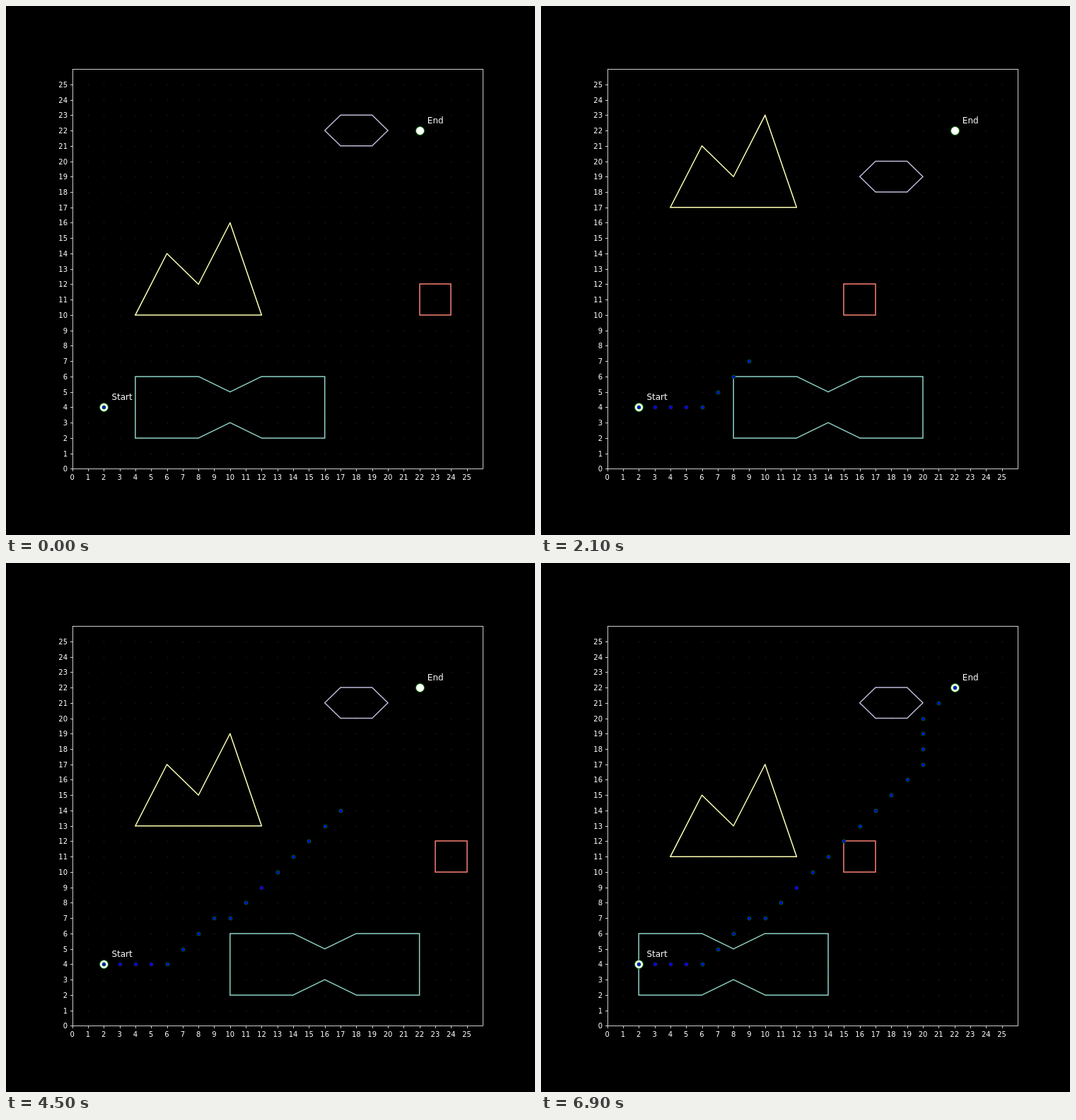
An HTML page with a canvas for the animation above (7.2 s loop, 748 by 748 pixels).

```html
<!DOCTYPE html>
<html lang="en">
<head>
<meta charset="utf-8">
<title>Path among moving obstacles</title>
<style>
  html, body { margin: 0; width: 100%; height: 100%; overflow: hidden; background: #000; }
  canvas { display: block; }
</style>
</head>
<body>
<canvas id="stage" width="748" height="748"></canvas>
<script>
const ctx = document.getElementById('stage').getContext('2d');
const STEP_MS = 300, STEPS = 24, CELLS = 26;
const LEFT = 93.6, BOTTOM = 654.4, UNIT_X = 22.32, UNIT_Y = 21.744;

const px = x => LEFT + x * UNIT_X;
const py = y => BOTTOM - y * UNIT_Y;
const mid = v => Math.floor(v + 0.5) + 0.5;

const BELT = [[0, 2], [4, 2], [6, 3], [8, 2], [12, 2], [12, 6], [8, 6], [6, 5], [4, 6], [0, 6]];
const PEAKS = [[4, 0], [6, 4], [8, 2], [10, 6], [12, 0]];
const HEX = [[16, 0], [17, 1], [19, 1], [20, 0], [19, -1], [17, -1]];
const BOX = [[0, 10], [2, 10], [2, 12], [0, 12]];

// The route is a start cell followed by runs of [count, dx, dy].
const RUNS = [[4, 1, 0], [3, 1, 1], [1, 1, 0], [10, 1, 1], [3, 0, 1], [2, 1, 1]];
const route = [[2, 4]];
for (const [count, dx, dy] of RUNS) {
  for (let i = 0; i < count; i++) {
    const [x, y] = route[route.length - 1];
    route.push([x + dx, y + dy]);
  }
}
const BLUISH = [1, 2, 3, 10];

// Triangle wave between 0 and range.
function bounce(n, range) {
  const p = n % (2 * range);
  return Math.min(p, 2 * range - p);
}

// Triangle wave that rests one step at each end.
function restingBounce(n, range) {
  const p = n % (2 * range + 2);
  return Math.min(p, 2 * range + 1 - p);
}

function outline(points, dx, dy, color, snap) {
  const fit = snap ? Math.round : v => v;
  ctx.strokeStyle = color;
  ctx.lineWidth = 1.5;
  ctx.lineJoin = 'round';
  ctx.lineCap = 'square';
  ctx.beginPath();
  for (const [x, y] of [...points, points[0]]) {
    ctx.lineTo(fit(px(x + dx)), fit(py(y + dy)));
  }
  ctx.stroke();
}

function marker(x, y, radius, fill, edge) {
  ctx.beginPath();
  ctx.arc(mid(px(x)), mid(py(y)), radius, 0, 2 * Math.PI);
  ctx.fillStyle = fill;
  ctx.fill();
  ctx.strokeStyle = edge;
  ctx.lineWidth = 1;
  ctx.stroke();
}

function line(x1, y1, x2, y2) {
  ctx.beginPath();
  ctx.moveTo(x1, y1);
  ctx.lineTo(x2, y2);
  ctx.stroke();
}

function label(text, x, y, size, align) {
  ctx.font = size + 'px "DejaVu Sans", sans-serif';
  ctx.textAlign = align;
  ctx.fillStyle = '#fff';
  ctx.fillText(text, x, y);
}

function drawGrid() {
  ctx.fillStyle = '#141614';
  for (let x = 1; x < CELLS; x++) {
    for (let y = 1; y < CELLS; y++) {
      ctx.beginPath();
      ctx.arc(mid(px(x)), mid(py(y)), 1, 0, 2 * Math.PI);
      ctx.fill();
    }
  }
}

function drawAxes() {
  const x0 = mid(px(0)), y0 = mid(py(0));
  const x1 = mid(px(CELLS)), y1 = mid(py(CELLS));
  ctx.strokeStyle = '#fff';
  ctx.lineWidth = 0.8;
  ctx.lineJoin = 'miter';
  ctx.lineCap = 'butt';
  ctx.strokeRect(x0, y0, x1 - x0, y1 - y0);
  for (let i = 0; i < CELLS; i++) {
    const x = mid(px(i)), y = mid(py(i));
    line(x, y0, x, y0 + 3.5);
    line(x0, y, x0 - 3.5, y);
    label(i, px(i), 670, 10, 'center');
    label(i, 87, Math.round(py(i)) + 4, 10, 'right');
  }
}

function draw(step) {
  ctx.fillStyle = '#000';
  ctx.fillRect(0, 0, 748, 748);
  drawGrid();
  outline(BELT, 2 + 2 * restingBounce(step + 1, 5), 0, '#8dd3c7');
  outline(PEAKS, 0, 8 + bounce(step + 2, 11), '#feffb3');
  outline(HEX, 0, 17 + bounce(step + 9, 7), '#bfbbd9');
  outline(BOX, 15 + bounce(step + 9, 8), 0, '#fa8174', true);
  drawAxes();
  marker(2, 4, 6, '#fff', '#008000');
  marker(22, 22, 6, '#fff', '#008000');
  for (let i = 0; i <= step; i++) {
    const [x, y] = route[i];
    marker(x, y, 2.5, '#00f', BLUISH.includes(i) ? '#20204c' : '#006400');
  }
  label('Start', px(2.5), 557, 12, 'left');
  label('End', px(22.5), 166, 12, 'left');
}

const began = performance.now();
function tick() {
  const elapsed = performance.now() - began;
  draw(Math.floor(elapsed / STEP_MS) % STEPS);
  requestAnimationFrame(tick);
}
tick();
</script>
</body>
</html>
```
